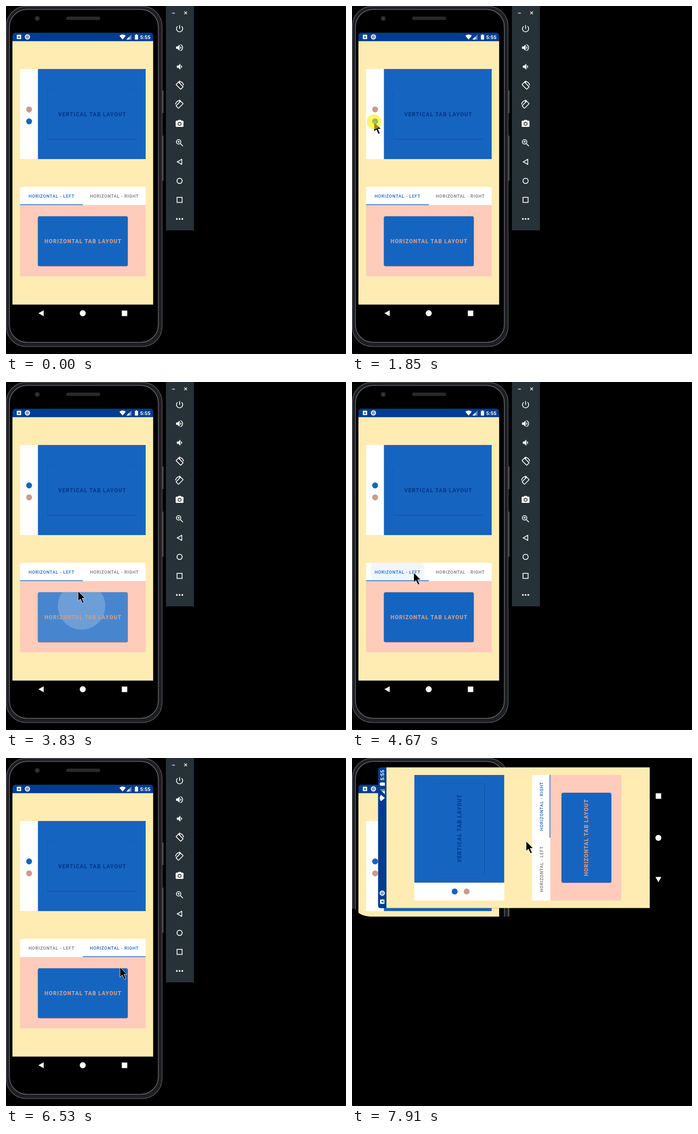
An HTML page that plays this animation: 740 px wide and 757 px high, repeating every 8 s.

```html
<!DOCTYPE html>
<html lang="en">
<head>
<meta charset="utf-8">
<title>Tab layouts</title>
<style>
  html, body { margin: 0; width: 100%; height: 100%; overflow: hidden; background: #000; }
  svg { display: block; width: 740px; height: 757px; }
  text { font-family: Roboto, sans-serif; text-anchor: middle; }
  .label { font-size: 11.9px; font-weight: 800; letter-spacing: 1.06px; }
  .tab { font-size: 9.4px; font-weight: 500; letter-spacing: .84px; }
  .line { fill: none; stroke: #fff; stroke-width: 2; }
</style>
</head>
<body>
<svg viewBox="0 0 740 757">
  <defs>
    <clipPath id="vClip"><rect x="69.5" y="137" width="234.5" height="196"/></clipPath>
    <clipPath id="hClip"><rect x="30.5" y="433" width="273.5" height="155"/></clipPath>
    <clipPath id="vCardClip"><rect x="89.5" y="181.5" width="195.5" height="108" rx="3.5"/></clipPath>
    <clipPath id="hCardClip"><rect x="69.5" y="457.5" width="195.5" height="108" rx="3.5"/></clipPath>
    <clipPath id="leftClip"><rect x="30.5" y="393.5" width="136.7" height="39.5"/></clipPath>
    <clipPath id="rightClip"><rect x="167.2" y="393.5" width="136.8" height="39.5"/></clipPath>
    <clipPath id="screenClip"><path d="M14 699V65q0-7 7-7H313.5q7 0 7 7V699Z"/></clipPath>
    <clipPath id="cropClip"><path d="M0 0H344V345H40Q15 343 6 328H0Z"/></clipPath>
  </defs>

  <g id="phone">
    <path d="M340 184h3v49h-3zM340 282h3v98h-3z" fill="#45413f"/>
    <rect x=".7" y=".7" width="339" height="740" rx="43" fill="#1d1e21" stroke="#53555a" stroke-width="1.5"/>
    <rect x="7.5" y="7.5" width="324" height="724" rx="38" fill="#000" stroke="#686a70" stroke-width="1.5"/>
    <rect x="131" y="23" width="74" height="7.5" rx="3.7" fill="#29292b"/>
    <circle cx="68" cy="27" r="5.5" fill="#252527"/><circle cx="68" cy="27" r="2.5" fill="#3b3b40"/>

    <g id="screen" clip-path="url(#screenClip)">
      <rect x="14" y="58" width="306.5" height="641"/>
      <rect x="14" y="76" width="306.5" height="573.5" fill="#ffecb3"/>
      <rect x="14" y="58" width="306.5" height="18.5" fill="#003c8f"/>
      <rect x="23.5" y="62.5" width="9.5" height="9.5" rx="1" fill="#fff"/>
      <text x="28.2" y="70.3" font-size="7.5" font-weight="800" fill="#003c8f">A</text>
      <circle cx="46.7" cy="67.3" r="4.7" fill="#7c9cc9" stroke="#fff" stroke-width="2"/>
      <path d="M246.7 64.5q7-5 14 0L253.7 73ZM280.5 63h2v-1.2h3V63h2v10h-7z" fill="#fff"/>
      <path d="M273 62V73H262Z" fill="#7290bf"/><path d="M268.5 66.5V73H262Z" fill="#fff"/>
      <text x="303.2" y="71.7" font-size="11.5" font-weight="600" fill="#fff">5:55</text>

      <rect x="30.5" y="137" width="39" height="196" fill="#fff"/>
      <circle id="dotA" cx="50.3" cy="225" r="6.4"/>
      <circle id="dotB" cx="50.3" cy="251" r="6.4"/>
      <g clip-path="url(#vClip)">
        <rect x="69" y="137" width="235" height="196" fill="#1565c0"/>
        <g id="vSlide"><g id="vCard"></g><use href="#vCard" y="196"/></g>
      </g>

      <rect x="30.5" y="393.5" width="273.5" height="39.5" fill="#fff"/>
      <g clip-path="url(#leftClip)"><circle id="leftRipple" fill="#1565c0"/></g>
      <g clip-path="url(#rightClip)"><circle id="rightRipple" fill="#1565c0"/></g>
      <text id="leftTab" class="tab" x="99.2" y="417">HORIZONTAL - LEFT</text>
      <text id="rightTab" class="tab" x="235.8" y="417">HORIZONTAL - RIGHT</text>
      <rect id="indicator" y="431.5" width="136.7" height="1.7" fill="#1565c0"/>
      <g clip-path="url(#hClip)">
        <rect x="30" y="433" width="275" height="155" fill="#ffccbc"/>
        <g id="hSlide"><g id="hCard"></g><use href="#hCard" x="273.5"/></g>
      </g>

      <path d="M70.5 668.3L82 662v12.8ZM252 662.5h12v12h-12z" fill="#fff"/>
      <circle cx="167" cy="668.3" r="6.5" fill="#fff"/>
    </g>
  </g>

  <g id="toolbar">
    <rect x="348" width="61" height="488" fill="#263238"/>
    <path class="line" style="stroke-width:1.3" d="M361.5 15.5h6M388 12l6 6m0-6l-6 6"/>
    <g id="icons"></g>
  </g>

  <use id="turned" href="#screen" transform="matrix(0 -1 1 0 -1.5 340.7)"/>

  <g id="cursor">
    <path d="M0 0V21.5L5 17L9.3 26.5L13 25L8.7 15.5H15.2Z" stroke="#fff" stroke-width=".9"/>
    <circle id="halo" r="16" fill="#fff000" opacity=".6"/>
  </g>
</svg>
<script>
const LOOP = 8000, TURN = 7910, BLUE = '#1565c0', PINK = '#cb9b8c', GREY = '#707076';
const $ = id => document.getElementById(id);
const clamp = v => Math.max(0, Math.min(1, v));
const mix = (a, b, p) => a + (b - a) * p;
const easeOut = (t, start, length, power) => 1 - (1 - clamp((t - start) / length)) ** power;

// Toolbar icons on a 24-unit grid, listed from top to bottom
const speaker = 'M3 9v6h4l5 5V4L7 9z';
const nearWave = 'M14 8v8q2.5-1.3 2.5-4T14 8z';
const fill = d => `<path fill="#fff" d="${d}"/>`;
const line = d => `<path class="line" d="${d}"/>`;
const rotate = `<rect class="line" x="7.5" y="3.5" width="9" height="17" rx="1" transform="rotate(-45 12 12)"/>
  ${line('M10 1.5Q20 .5 22.5 11')}${fill('M8.5 1.5L13 -1.5V5z')}`;
const icons = [
  line('M12 3v10M7 6A8 8 0 1 0 17 6'),
  fill(speaker + nearWave) + line('M14 4.3a8 8 0 0 1 0 15.4'),
  `<g transform="translate(2)">${fill(speaker + nearWave)}</g>`,
  rotate,
  `<g transform="matrix(-1 0 0 1 24 0)">${rotate}</g>`,
  fill('M9 2L7.2 4H4q-2 0-2 2v12q0 2 2 2h16q2 0 2-2V6q0-2-2-2h-3.2L15 2z') +
    '<circle cx="12" cy="12" r="4" fill="#fff" stroke="#263238" stroke-width="2"/>',
  '<circle class="line" cx="9.5" cy="9.5" r="5.7"/>' + line('M14 14l6.5 6.5M9.5 7v5M7 9.5h5'),
  line('M17.5 5.5v13L6 12z'),
  '<circle class="line" cx="12" cy="12" r="6.7"/>',
  '<rect class="line" x="5.5" y="5.5" width="13" height="13"/>',
  [5, 12, 19].map(x => `<circle cx="${x}" cy="12" r="2.2" fill="#fff"/>`).join('')
];
$('icons').innerHTML = icons.map((icon, i) =>
  `<g transform="translate(367.6 ${39 + i * 41.4}) scale(.85)">${icon}</g>`).join('');

function makeCard(id, word, x, y, color, shadow) {
  const box = `x="${x}" y="${y}" width="195.5" height="108" rx="3.5"`;
  $(id).innerHTML = `
    <rect ${box} fill="none" stroke="#000" stroke-opacity="${shadow / 2}" stroke-width="1.5"/>
    <rect ${box} transform="translate(0 1)" fill="#000" opacity="${shadow}"/>
    <rect ${box} fill="${BLUE}"/>
    <g clip-path="url(#${id}Clip)">
      <rect id="${id}Glow" ${box} fill="#fff"/><circle id="${id}Ripple" fill="#fff"/>
    </g>
    <text class="label" x="${x + 98.3}" y="${y + 58}" fill="${color}">${word} TAB LAYOUT</text>`;
}
makeCard('vCard', 'VERTICAL', 89.5, 181.5, '#003c8f', .18);
makeCard('hCard', 'HORIZONTAL', 69.5, 457.5, PINK, .28);

// Pointer path: time, x, y
const path = [
  [70, 544, 712], [400, 310, 460], [700, 125, 290], [840, 110, 268], [1050, 110, 268],
  [1300, 85, 274], [1540, 44, 268], [1710, 48, 252], [2030, 48, 252], [2410, 114, 258],
  [2550, 121, 260], [2740, 121, 260], [3340, 160, 470], [3730, 163, 475], [3830, 157, 455],
  [4200, 138, 426], [4430, 100, 412], [4560, 100, 412], [4900, 205, 420], [5070, 212, 423],
  [5320, 212, 423], [5840, 232, 468], [6150, 235, 470], [6530, 247, 455], [6690, 418, 466],
  [6850, 418, 467], [7530, 379, 192], [7650, 379, 181], [LOOP, 379, 181]
];
// Touches: part, time, centre of the part
const touches = [
  ['vCard', 930, 187, 235], ['dot', 1920], ['vCard', 2580, 187, 235], ['hCard', 3730, 167, 511],
  ['leftRipple', 4480, 99, 413], ['rightRipple', 5080, 235, 413], ['hCard', 5950, 167, 511],
  ['rotate', 7810]
];

function pointer(t) {
  const i = Math.max(1, path.findIndex(k => k[0] >= t));
  const [a, b] = [path[i - 1], path[i]];
  const p = clamp((t - a[0]) / (b[0] - a[0]));
  return [mix(a[1], b[1], p), mix(a[2], b[2], p)];
}

function set(el, attrs) {
  for (const name in attrs) el.setAttribute(name, attrs[name]);
}

function drawTouch(part, t) {
  const touch = touches.filter(k => k[0] === part && k[1] <= t).pop();
  const isCard = part.endsWith('Card');
  const age = touch ? t - touch[1] : LOOP;
  const fade = 1 - clamp((age - 300) / 280);
  const circle = $(isCard ? part + 'Ripple' : part);
  if (touch) {
    const [x, y] = pointer(touch[1]), p = clamp(age / 300);
    set(circle, { cx: mix(x, touch[2], p), cy: mix(y, touch[3], p), r: mix(20, isCard ? 114 : 80, p) });
  }
  set(circle, { opacity: fade * (isCard ? .2 : .06) });
  if (isCard) set($(part + 'Glow'), { opacity: .21 * fade * clamp(age / 50) });
}

function render(t) {
  const turned = t >= TURN;
  $('turned').style.display = turned ? '' : 'none';
  $('toolbar').style.display = turned ? 'none' : '';
  set($('phone'), { 'clip-path': turned ? 'url(#cropClip)' : 'none' });

  const lower = t >= 1960, right = t >= 5150;
  set($('dotA'), { fill: lower ? BLUE : PINK });
  set($('dotB'), { fill: lower ? PINK : BLUE });
  set($('leftTab'), { fill: right ? GREY : BLUE });
  set($('rightTab'), { fill: right ? BLUE : GREY });
  set($('vSlide'), { transform: `translate(0 ${-196 * easeOut(t, 1960, 340, 5)})` });
  set($('hSlide'), { transform: `translate(${-273.5 * easeOut(t, 5150, 340, 5)} 0)` });
  set($('indicator'), { x: 30.5 + 136.8 * easeOut(t, 5150, 300, 2.2) });
  ['vCard', 'hCard', 'leftRipple', 'rightRipple'].forEach(id => drawTouch(id, t));

  $('cursor').style.display = t < 70 ? 'none' : '';
  set($('cursor'), { transform: `translate(${pointer(t)})` });
  const held = touches.some(([, at]) => t >= at - 120 && t < at);
  $('halo').style.display = held ? '' : 'none';
}

const start = performance.now();
function tick() {
  render((performance.now() - start) % LOOP);
  requestAnimationFrame(tick);
}
tick();
</script>
</body>
</html>
```
